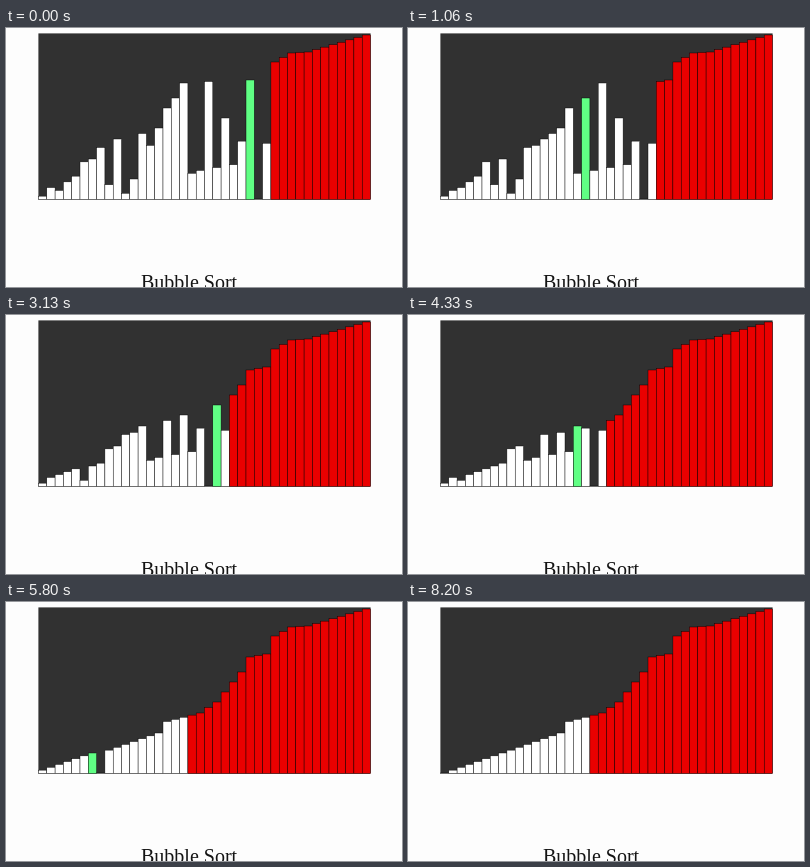
An HTML page that plays this animation: 396x259 px, repeating every 8400 ms.

```html
<!DOCTYPE html>
<html lang="en">
<head>
<meta charset="utf-8">
<title>Bubble Sort</title>
<style>
  html, body { margin: 0; width: 100%; height: 100%; overflow: hidden; background: #fdfdfd; }
  svg { display: block; }
  #bars rect { stroke: #000; stroke-width: .42; }
  text { font: 20px "Liberation Serif", "Times New Roman", serif; fill: #141414; }
</style>
</head>
<body>
<svg width="396" height="259" viewBox="0 0 396 259">
  <rect x="32.4" y="5.4" width="332.2" height="166.2" fill="#313131"/>
  <g id="bars"></g>
  <text x="135" y="261">Bubble Sort</text>
</svg>
<script>
const LOOP = 8400, FPS = 15;
const COUNT = 40, LEFT = 32.5, BASE = 171.5, BAR = 8.3;
const WHITE = '#fff', GREEN = '#60ff84', RED = '#ea0000';

// Outline of the sorted bars: [rank, top edge], straight in between.
const outline = [
  [0, 171], [14, 131], [15, 119.5], [19, 111], [21, 100], [24, 70],
  [25, 55], [27, 52], [28, 34], [30, 25], [32, 24], [39, 7]
];

// Bars still out of order: [rank, place]. All others stand in rising order.
const strays = [
  [3, 2], [5, 8], [2, 10], [7, 11], [16, 13], [9, 18], [10, 19],
  [11, 21], [22, 22], [12, 23], [18, 24], [0, 26], [17, 27]
];

function topOf(rank) {
  const i = Math.max(1, outline.findIndex(p => p[0] >= rank));
  const [r0, y0] = outline[i - 1], [r1, y1] = outline[i];
  return y0 + (y1 - y0) * (rank - r0) / (r1 - r0);
}

function startOrder() {
  const ranks = [...Array(COUNT).keys()];
  const placed = new Map(strays.map(([rank, place]) => [place, rank]));
  const moved = new Set(placed.values());
  const rest = ranks.filter(r => !moved.has(r));
  return ranks.map(i => placed.has(i) ? placed.get(i) : rest.shift());
}

// One state for each swap, taken just before it happens.
function sortStates(a, from, end) {
  const states = [];
  let red = end + 1;
  for (; end > 0; end--, from = 0) {
    let last = -1;
    for (let j = from; j < end; j++) {
      if (a[j] <= a[j + 1]) continue;
      states.push({ a: a.slice(), active: j, red });
      [a[j], a[j + 1]] = [a[j + 1], a[j]];
      last = j + 1;
    }
    if (last === end) red = end;
  }
  states.push({ a, active: -1, red });
  return states;
}

// The loop opens in the middle of a pass.
const states = sortStates(startOrder(), 25, 27);

// About two of three ticks refresh the picture.
function refreshAt(ms) {
  const tick = Math.floor((ms + 8) * FPS / 1000);
  const held = Math.floor((tick - (tick < 17 ? 2 : 4)) / 3);
  return tick - Math.max(0, held);
}

// Swaps done after n refreshes: slightly slower at both ends.
const swapsAt = n => Math.floor(n * (1.782 - 4e-5 * (n - 47) ** 2));

const group = document.getElementById('bars');
const bars = Array.from({ length: COUNT }, (_, i) => {
  const r = document.createElementNS('http://www.w3.org/2000/svg', 'rect');
  r.setAttribute('x', LEFT + i * BAR);
  r.setAttribute('width', BAR);
  return group.appendChild(r);
});

let shown = null;
function draw(state) {
  if (state === shown) return;
  shown = state;
  bars.forEach((r, i) => {
    const top = topOf(state.a[i]);
    r.setAttribute('y', top);
    r.setAttribute('height', BASE - top);
    r.setAttribute('fill', i === state.active ? GREEN : i >= state.red ? RED : WHITE);
  });
}

function frame() {
  // The pace curve is only used until the sort is done.
  const n = Math.min(refreshAt(performance.now() % LOOP), 64);
  draw(states[Math.min(swapsAt(n), states.length - 1)]);
  requestAnimationFrame(frame);
}
frame();
</script>
</body>
</html>
```
